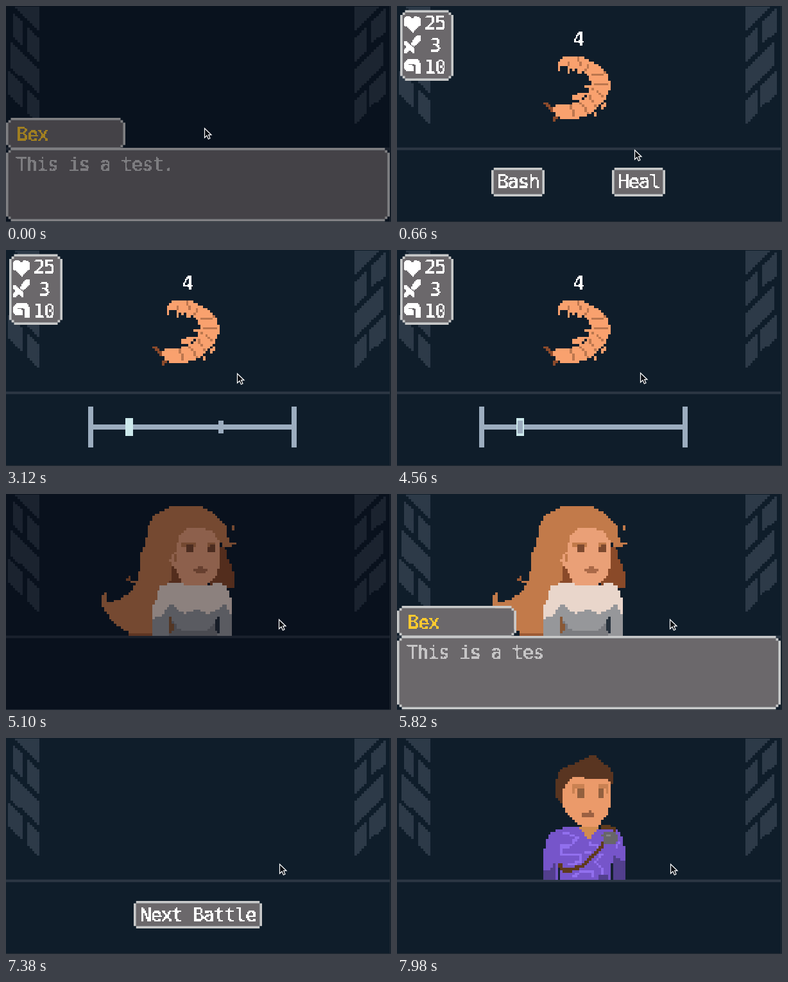
Animation, 600 px wide and 338 px high, one loop 8 s. Source, as an HTML page with a canvas:

```html
<!DOCTYPE html>
<html lang="en">
<head>
<meta charset="utf-8">
<title>Pixel battle</title>
<style>
  html, body { margin: 0; width: 100%; height: 100%; overflow: hidden; background: #0f1d2a; }
  canvas { display: block; width: 600px; height: 338px; }
</style>
</head>
<body>
<canvas id="stage" width="600" height="338"></canvas>
<script>
const LOOP = 8000, STEP = 60, CELL = 3.75, FINE = CELL / 2;
const ctx = document.getElementById('stage').getContext('2d');
const FONT = '"DejaVu Sans Mono", monospace';

// Runs each paint function on a coarse grid and hardens its edges.
function snap(cell, width, height, paints) {
  const make = () => Object.assign(document.createElement('canvas'),
    { width: Math.ceil(width / cell), height: Math.ceil(height / cell) });
  const out = make(), outCtx = out.getContext('2d');
  const tmp = make(), g = tmp.getContext('2d', { willReadFrequently: true });
  for (const paint of paints) {
    g.setTransform(1, 0, 0, 1, 0, 0);
    g.clearRect(0, 0, tmp.width, tmp.height);
    g.scale(1 / cell, 1 / cell);
    paint(g);
    const image = g.getImageData(0, 0, tmp.width, tmp.height);
    for (let i = 3; i < image.data.length; i += 4) image.data[i] = image.data[i] > 115 ? 255 : 0;
    g.putImageData(image, 0, 0);
    outCtx.drawImage(tmp, 0, 0);
  }
  return { image: out, width: out.width * cell, height: out.height * cell };
}

// Shapes are [colour, path, lineWidth?] in stage pixels.
function sprite(shapes, cell = CELL) {
  return snap(cell, 600, 337.5, shapes.map(([color, d, lineWidth]) => g => {
    const path = new Path2D(d);
    g.fillStyle = g.strokeStyle = color;
    g.lineWidth = lineWidth;
    if (lineWidth) g.stroke(path);
    else g.fill(path);
  }));
}

const BRICK = '#2d3a48';
const walls = sprite([
  [BRICK, 'M13 0H52V39ZM10 9L25 24V62L10 47ZM33 32L52 51V88L33 69ZM6 54L52 99V137L6 93ZM3 100L25 122V159L3 138ZM33 130L52 149V186L33 166Z'],
  [BRICK, 'M582 0H543V39ZM592 3L569 25V56L592 41ZM562 32L543 51V88L562 69ZM589 54L543 99V137L589 93ZM592 100L566 125V159L592 138ZM562 130L543 149V186L562 166Z']
]);

const icons = sprite([
  ['#fff', 'M11 21L15 16H22L24 20L27 16H33L38 21V28L25 41L11 28Z'],
  ['#fff', 'M38 46V53L27 64L21 58L32 46ZM11 54H15L28 67V72H24L11 59ZM11 69L18 62L22 66L15 73H11Z'],
  ['#fff', 'M12 88L18 82H32L37 88V105H30V93L26 89H20L17 92H24L26 96V101H16L12 97Z']
], FINE);

const centipede = sprite([
  ['#8c4b2c', 'M231 151L244 163M243 179L250 172', 4],
  ['#f9a16e', 'M250 88L258 80L273 77L287 79L303 86L317 92L327 103L332 116V129L326 144L316 156L305 166L290 173L270 176H256L247 169L243 160L250 153L262 155L275 152L290 147L298 137L303 126L302 113L295 104L284 97L270 94L257 95L250 96Z'],
  ['#f9a16e', 'M254 94V101M269 94V104M275 94V100M285 96V107M304 125H293M300 138H282M292 142H273M284 141V147M328 128H336M323 148V157M318 156L324 162M309 164V171', 4],
  ['#bb774f', 'M265 81L270 94M283 80L287 94M301 87L294 101M327 104L301 109M331 124L304 120M322 141L304 127M312 159L299 138M298 168L287 150M278 174L271 154', 3.2]
]);

const woman = sprite([
  ['#8a4a29', 'M322 82H341L347 101L356 125V146H318ZM240 146L258 104L292 146Z'],
  ['#eaa077', 'M266 56L298 46L322 52L332 68L333 112L327 130L313 143H281L271 131L264 116L256 107V96L265 91L268 72Z'],
  ['#c27a4a', 'M223 50L231 34L240 28L258 20H304L318 25L330 34L337 42L344 51V62L350 74H359V78L349 82H340L332 70L320 56L300 51L282 53L272 61L268 77L264 91L256 100L260 122L256 136L244 145L238 158L231 179L228 205L234 222H206L184 213L165 197L156 183L150 173V158L155 155L160 152L156 164L161 170L181 163L196 151L205 137H194L189 129L197 134L207 133L211 95L218 75ZM351 50H358V54H351Z'],
  ['#9d5a34', 'M190 217H230V222H190ZM189 129H196V136H189Z'],
  ['#c27a4a', 'M262 94H267V103H262ZM274 77H297V81H274ZM315 77H329V81H315Z'],
  ['#7d492f', 'M281 80H293V91H281ZM317 80H327V91H317Z'],
  ['#ab6a48', 'M292 117H315V121H292ZM297 121H310V125H297ZM299 113H307V117H299Z'],
  ['#e9d6cb', 'M240 143L268 138L284 143H314L330 138L344 143L352 165V222H228V182L236 160Z'],
  ['#96979a', 'M228 194L242 190L251 180L259 170L269 182L281 187L299 180L315 187L332 180L341 170L348 180L352 190V222H228Z'],
  ['#7b7c80', 'M255 193L269 210L281 214H315L330 194V222H255Z'],
  ['#8a5936', 'M254 190H258L262 211V216H255Z'],
  ['#27313c', 'M328 193H334V216H328Z']
]);

const man = sprite([
  ['#593521', 'M248 66L255 51L268 42L290 35L308 23L322 38L334 45L338 66L330 78L258 101L248 91Z'],
  ['#eb9a6a', 'M264 72L276 59L286 58L300 66H333V106L327 122L313 138H289L273 126L263 114L257 101L259 83Z'],
  ['#c98152', 'M274 73H293V77H278V85H274ZM313 73H330V85H326V77H313Z'],
  ['#93603f', 'M281 80H292V95H281ZM315 80H324V95H315Z'],
  ['#9b6142', 'M289 118H308V122H289ZM300 113H305V118H300Z'],
  ['#d18c50', 'M285 138H314V149L299 164L285 149Z'],
  ['#7655ca', 'M236 154L244 145L258 141L285 138L298 160L313 143L330 138L345 144L353 158L356 182V222H229V181Z'],
  ['#523f8d', 'M229 208H239L248 190V222H229ZM337 181L352 193H356V222H337ZM316 213H330V222H316Z'],
  ['#15222f', 'M251 195H255V222H251ZM333 195H337V222H333Z'],
  ['#9270ee', 'M260 146L282 155L270 169H257V181H287V193L266 199M300 164L318 170L307 181L291 176M321 179L309 194L322 205V214M275 216L289 207H304L307 219M347 161L341 174', 3.8],
  ['#5f3b1c', 'M254 196L258 206H273L291 199L309 182L326 160M319 139H335L342 148', 5],
  ['#686669', 'M325 145H339L345 152V160L338 166H327L321 159V151Z'],
  ['#828286', 'M327 149H335V153H327Z']
]);

const clamp = v => Math.min(1, Math.max(0, v));
const ramp = (t, from, to) => clamp((t - from) / (to - from));
const pulse = (t, a, b, c, d) => ramp(t, a, b) * (1 - ramp(t, c, d));

// Piecewise linear value over [time, ...values] stops.
function track(t, stops) {
  const next = stops.findIndex(s => s[0] > t);
  if (next < 0) return stops[stops.length - 1].slice(1);
  const a = stops[next - 1], b = stops[next], k = (t - a[0]) / (b[0] - a[0]);
  return a.slice(1).map((v, i) => v + (b[i + 1] - v) * k);
}

function rect(color, x, y, w, h) {
  ctx.fillStyle = color;
  ctx.fillRect(x, y, w, h);
}

function blit(art, x = -0.75, y = 0.5) {
  ctx.imageSmoothingEnabled = false;
  ctx.drawImage(art.image, x, y, art.width, art.height);
}

const labels = new Map();
function label(str, color) {
  const key = color + str;
  if (!labels.has(key)) {
    labels.set(key, snap(FINE, 17 * str.length + 4, 36, [g => {
      g.font = `30px ${FONT}`;
      g.letterSpacing = '-1.65px';
      g.fillStyle = g.strokeStyle = color;
      g.lineWidth = 0.4;
      g.fillText(str, 0, 28);
      g.strokeText(str, 0, 28);
    }]));
  }
  return labels.get(key);
}

function text(str, x, y, color = '#fff') {
  blit(label(str, color), x, y - 28);
}

function centered(str, x, y) {
  text(str, x - str.length * 8.2, y);
}

// A deep corner is cut by one more cell than a plain one.
function panel(x, y, w, h, deep = false) {
  const p = CELL, light = '#c8c9c9', cut = deep ? 2 * p : p;
  rect('#6b686b', x + p, y + p, w - 2 * p, h - 2 * p);
  for (const edge of [y, y + h - p]) rect(light, x + cut, edge, w - 2 * cut, p);
  for (const edge of [x, x + w - p]) rect(light, edge, y + cut, p, h - 2 * cut);
  if (!deep) return;
  for (const cx of [x + p, x + w - 2 * p])
    for (const cy of [y + p, y + h - 2 * p]) rect(light, cx, cy, p, p);
}

function button(str, x, y, w, h) {
  panel(x, y, w, h);
  centered(str, x + w / 2, y + 32);
}

function withAlpha(alpha, draw) {
  if (alpha <= 0) return;
  ctx.globalAlpha = alpha;
  draw();
  ctx.globalAlpha = 1;
}

function dialog(line) {
  panel(0, 175, 186, 50, true);
  panel(0, 222, 598, 115, true);
  text('Bex', 16, 211, '#ffca30');
  text(line, 15, 258, '#c6c5c6');
}

function gauge(t) {
  const steel = '#9cadbf', left = 140, span = 302, speed = 0.463;
  const travel = Math.max(0, Math.min(t, 3890) - 1394) * speed % (2 * span);
  const x = left + span - Math.abs(span - travel);
  rect(steel, 128, 245, 8, 64);
  rect(steel, 445, 245, 8, 64);
  rect(steel, 136, 273, 309, 8);
  rect('#cce8eb', 186, 263, 12, 28);
  rect(steel, Math.round(x) - 4, 267, 8, 20);
}

function battle(t) {
  panel(5, 6.5, 83, 110.5, true);
  blit(icons);
  centered('25', 59, 37);
  centered('3', 59, 72);
  centered('10', 59, 106);
  centered('4', 282, 62);
  blit(centipede);
  withAlpha(1 - ramp(t, 1080, 1200), () => {
    button('Bash', 147, 253, 83, 45);
    button('Heal', 335, 253, 83, 45);
  });
  withAlpha(ramp(t, 1200, 1380), () => gauge(t));
}

function aftermath(t) {
  withAlpha(1 - ramp(t, 6300, 6600), () => blit(woman));
  const line = 'This is a test.'.slice(0, Math.max(0, Math.floor((t - 5340) / 36)));
  withAlpha(pulse(t, 5280, 5400, 6180, 6420), () => dialog(line));
  if (t >= 6660 && t < 6900) {
    withAlpha(0.07, () => {
      ctx.fillStyle = '#6b3a20';
      ctx.beginPath();
      ctx.roundRect(199, 259, 200, 37, 3);
      ctx.fill();
    });
  }
  withAlpha(pulse(t, 6840, 7140, 7440, 7720) * (t >= 6900), () => button('Next Battle', 199, 255, 200, 43));
  withAlpha(ramp(t, 7700, 7940), () => blit(man));
}

function pointer(t) {
  const [x, y] = track(t, [
    [0, 310, 192], [660, 371, 226], [1080, 205, 272], [1200, 205, 272], [1800, 343, 195],
    [4560, 380, 193], [5100, 426, 197], [6660, 427, 198], [8000, 427, 198]
  ]);
  ctx.save();
  ctx.translate(Math.round(x) - 1, Math.round(y) - 1);
  const arrow = new Path2D('M.5 .5V15L4 11.7L6.4 17.2L9 16L6.7 10.7H11Z');
  ctx.fillStyle = '#0a0d12';
  ctx.fill(arrow);
  ctx.strokeStyle = '#fff';
  ctx.lineWidth = 1.2;
  ctx.stroke(arrow);
  ctx.restore();
}

function draw(t) {
  rect('#0f1d2a', 0, 0, 600, 338);
  blit(walls);
  rect('#2c3744', 0, 221.5, 598, 4);
  if (t < 180) dialog('This is a test.');
  else if (t < 4920) battle(t);
  else aftermath(t);
  const [dim] = track(t, [[0, 0.37], [180, 1], [480, 0], [4620, 0], [4920, 1], [5220, 0], [8000, 0]]);
  withAlpha(dim, () => rect('#02000a', 0, 0, 600, 338));
  rect('#232b34', 598, 0, 1, 338);
  rect('#232b34', 0, 337, 600, 1);
  pointer(t);
}

function frame() {
  const t = performance.now() % LOOP;
  draw(t >= 7980 ? 7980 : Math.floor(t / STEP) * STEP);
  requestAnimationFrame(frame);
}
frame();
</script>
</body>
</html>
```
